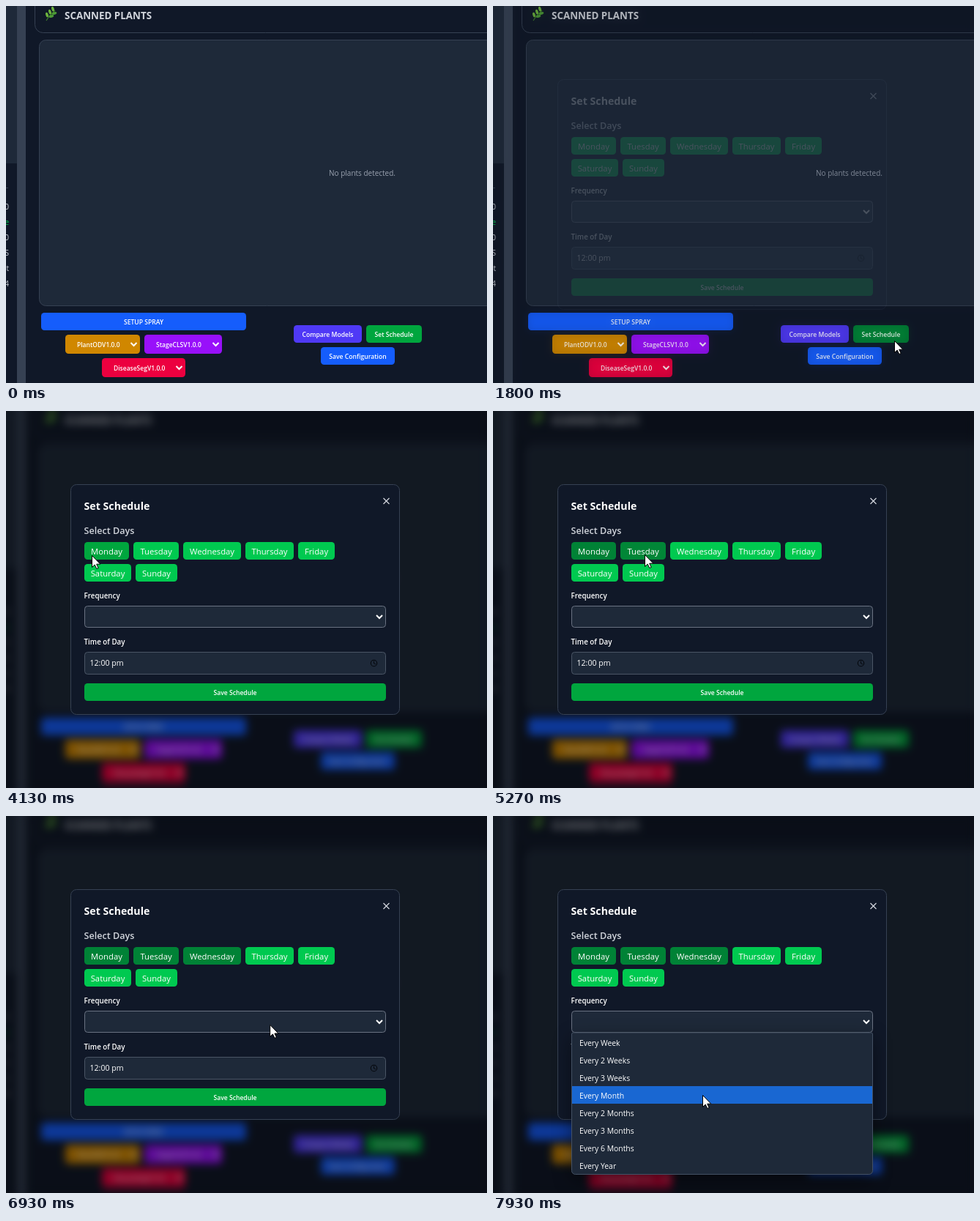
An HTML page with a canvas that plays this animation: 657 px wide and 515 px high, repeating every 8000 ms.

```html
<!DOCTYPE html>
<html lang="en">
<head>
<meta charset="utf-8">
<title>Set Schedule</title>
<style>
  html, body { margin: 0; width: 100%; height: 100%; overflow: hidden; background: #101828; }
  canvas { display: block; }
</style>
</head>
<body>
<canvas id="stage" width="657" height="515"></canvas>
<script>
const W = 657, H = 515, LOOP = 8000, FADE = 200;
const PAGE = '#101828', PANEL = '#1e2939', LINE = '#364153', WHITE = '#fff', LIGHT = '#d1d5dc';
const BLUE = '#155dfc';
const GREEN = [[0, 201, 80], [0, 166, 62], [0, 130, 54], [1, 102, 48]];

const stage = document.getElementById('stage').getContext('2d');
const makeLayer = () => {
  const canvas = document.createElement('canvas');
  canvas.width = W;
  canvas.height = H;
  return canvas.getContext('2d');
};
const backdrop = makeLayer(), dialog = makeLayer();

const clamp = v => Math.max(0, Math.min(1, v));
const smooth = v => v * v * (3 - 2 * v);
const mix = (a, b, k) => a.map((v, i) => v + (b[i] - v) * k);
const rgb = c => `rgb(${c.map(Math.round).join(',')})`;

// Pointer moves: eased from one resting place to the next, some along a bend.
const ENTRY = [661, 520];
const MOVES = [
  { start: 280, end: 1260, to: [548, 457] },
  { start: 2440, end: 3270, to: [182, 175], bend: [526, 184] },
  { start: 3320, end: 4130, to: [117, 197], bend: [120, 206] },
  { start: 4530, end: 4790, to: [207, 196] },
  { start: 5300, end: 5670, to: [292, 196] },
  { start: 6150, end: 6470, to: [409, 246] },
  { start: 6640, end: 7000, to: [355, 289] },
  { start: 7620, end: 7930, to: [286, 381] }
];

function pointerAt(t) {
  let from = ENTRY;
  for (const { start, end, to, bend = mix(from, to, 0.5) } of MOVES) {
    if (t < end) {
      const k = smooth(clamp((t - start) / (end - start)));
      return mix(mix(from, bend, k), mix(bend, to, k), k);
    }
    from = to;
  }
  return from;
}

// Hover colour fades in and out: the share of the fade window spent inside the box.
function hoverLevel(t, x, y, w, h) {
  const steps = 16;
  let inside = 0;
  for (let i = 0; i < steps; i++) {
    const [px, py] = pointerAt(t - i * FADE / steps);
    if (px >= x && px < x + w && py >= y && py < y + h) inside++;
  }
  return inside / steps;
}

function text(c, str, x, y, size, { weight = 400, color = WHITE, align = 'left' } = {}) {
  c.font = `${weight} ${size}px "Open Sans", "Noto Sans", sans-serif`;
  c.fillStyle = color;
  c.textAlign = align;
  c.fillText(str, x, y);
}

function box(c, x, y, w, h, r, fill, border) {
  const inset = border ? 0.5 : 0;
  c.beginPath();
  c.roundRect(x + inset, y + inset, w - 2 * inset, h - 2 * inset, r);
  c.fillStyle = fill;
  c.fill();
  if (border) {
    c.strokeStyle = border;
    c.lineWidth = 1;
    c.stroke();
  }
}

function line(c, points, color, width) {
  c.beginPath();
  points.forEach(([x, y]) => c.lineTo(x, y));
  c.strokeStyle = color;
  c.lineWidth = width;
  c.stroke();
}

const chevron = (c, x, y) => line(c, [[x - 4, y - 2], [x, y + 2], [x + 4, y - 2]], WHITE, 2);

function button(c, label, x, y, w, fill) {
  box(c, x, y, w, 24, 4.5, fill);
  text(c, label, x + w / 2, y + 16, 8.6, { weight: 600, align: 'center' });
}

function picker(c, label, x, y, w, fill) {
  box(c, x, y, w, 26, 4.5, fill);
  text(c, label, x + 16, y + 17, 8.5, { weight: 600 });
  chevron(c, x + w - 8.5, y + 13);
}

// Lays out [label, width, fill] items side by side around a centre.
function row(c, draw, center, y, ...items) {
  const gap = 6;
  let x = center - (items.reduce((sum, item) => sum + item[1] + gap, -gap)) / 2;
  for (const [label, w, fill] of items) {
    draw(c, label, x, y, w, fill);
    x += w + gap;
  }
}

function sprig(c) {
  line(c, [[55, 20], [59, 14], [67, 6]], '#3f7d2c', 1.2);
  for (let i = 0; i < 5; i++) {
    const side = i % 2 ? 1 : -1;
    c.beginPath();
    c.ellipse(58 + 2 * i + 2 * side, 14 - 2 * i + 2 * side, 3.4, 1.8, 0.5 - side * 0.8, 0, 7);
    c.fillStyle = side > 0 ? '#4c9a36' : '#6cb33e';
    c.fill();
  }
}

function drawPage(c, hover) {
  c.fillStyle = PAGE;
  c.fillRect(0, 0, W, H);
  c.fillStyle = PANEL;
  c.fillRect(0, 0, 15, 215);
  c.fillStyle = LINE;
  c.fillRect(15, 0, 12, H);
  c.fillRect(0, 248, 3, 1);
  [...'0e0St4'].forEach((ch, i) =>
    text(c, ch, 4, 278 + 21 * i, 10, { color: ch === 'e' ? '#00c950' : LIGHT, align: 'right' }));

  box(c, 39, -40, W, 77, 11, PAGE, LINE);
  sprig(c);
  text(c, 'SCANNED PLANTS', 80, 18, 13.4, { weight: 700, color: LIGHT });
  box(c, 45, 46, W, 364, 9, PANEL, LINE);
  text(c, 'No plants detected.', 441, 232, 10, { color: '#99a1af' });

  const schedule = rgb(mix(GREEN[1], GREEN[2], hover));
  row(c, button, 188, 419, ['SETUP SPRAY', 280, BLUE]);
  row(c, picker, 188, 449, ['PlantODV1.0.0', 102, '#d08700'], ['StageCLSV1.0.0', 106, '#9810fa']);
  row(c, picker, 188, 481, ['DiseaseSegV1.0.0', 114, '#ec003f']);
  row(c, button, 480.5, 436, ['Compare Models', 93, '#4f39f6'], ['Set Schedule', 76, schedule]);
  row(c, button, 480.5, 466, ['Save Configuration', 101, BLUE]);
}

function drawBackdrop() {
  const page = makeLayer();
  drawPage(page, 0);
  backdrop.filter = 'blur(6px)';
  // Repeated passes make the soft outer edges opaque.
  for (let i = 0; i < 6; i++) backdrop.drawImage(page.canvas, 0, 0);
  backdrop.filter = 'none';
  backdrop.fillStyle = 'rgba(0,0,0,0.4)';
  backdrop.fillRect(0, 0, W, H);
}

const DAYS = { Monday: 61, Tuesday: 62, Wednesday: 79, Thursday: 66, Friday: 50, Saturday: 64, Sunday: 57 };
const CLICKS = { Monday: 4440, Tuesday: 5170, Wednesday: 5980 };
const OPTIONS = ['Week', '2 Weeks', '3 Weeks', 'Month', '2 Months', '3 Months', '6 Months', 'Year'];

function drawDays(c, t) {
  const left = 107, right = 519;
  let x = left, y = 179;
  for (const [label, w] of Object.entries(DAYS)) {
    if (x + w >= right) {
      x = left;
      y += 30;
    }
    const hover = hoverLevel(t, x, y, w, 24);
    const plain = mix(GREEN[0], GREEN[1], hover), chosen = mix(GREEN[2], GREEN[3], hover);
    const picked = label in CLICKS ? clamp((t - CLICKS[label]) / FADE) : 0;
    box(c, x, y, w, 24, 4.5, rgb(mix(plain, chosen, picked)));
    text(c, label, x + w / 2, y + 17, 11.3, { weight: 500, align: 'center' });
    x += w + 6;
  }
}

function drawOptions(c, t) {
  c.save();
  c.shadowColor = 'rgba(0,0,0,0.45)';
  c.shadowBlur = 26;
  c.shadowOffsetY = 8;
  c.beginPath();
  c.roundRect(107.5, 296, 411, 193.5, [2, 2, 5, 5]);
  c.fillStyle = PANEL;
  c.fill();
  c.restore();
  c.strokeStyle = '#435063';
  c.lineWidth = 1;
  c.stroke();

  const top = 297, step = 24;
  const current = Math.floor((pointerAt(t)[1] - top) / step);
  OPTIONS.forEach((label, i) => {
    const y = top + step * i;
    if (i === current) {
      c.fillStyle = '#1967d2';
      c.fillRect(108, y, 410, step);
    }
    text(c, 'Every ' + label, 118, y + 17, 10.4);
  });
}

function drawDialog(c, t) {
  c.drawImage(backdrop.canvas, 0, 0);
  box(c, 88, 100, 450, 315, 8, PAGE, LINE);
  text(c, 'Set Schedule', 106.5, 135, 14.2, { weight: 700 });
  line(c, [[515.5, 119], [523.5, 127]], LIGHT, 1.2);
  line(c, [[523.5, 119], [515.5, 127]], LIGHT, 1.2);
  text(c, 'Select Days', 106.5, 168, 12.6, { weight: 600, color: LIGHT });
  drawDays(c, t);

  text(c, 'Frequency', 106.5, 256, 9.8, { weight: 600 });
  box(c, 107, 266, 412, 30, 4, PANEL, '#6a7282');
  chevron(c, 510, 281);

  text(c, 'Time of Day', 106.5, 319, 9.8, { weight: 600 });
  box(c, 107, 329, 412, 31, 4, PANEL, '#4a5565');
  text(c, '12:00 pm', 114.5, 348, 10.6, { weight: 500 });
  c.beginPath();
  c.arc(502.5, 344.5, 4.2, 0, 7);
  c.strokeStyle = '#05080d';
  c.lineWidth = 1.1;
  c.stroke();
  line(c, [[502.5, 341.5], [502.5, 344.8], [505, 345.8]], '#05080d', 1);

  button(c, 'Save Schedule', 107, 372, 412, rgb(GREEN[1]));
  if (t >= 7390) drawOptions(c, t);
}

function drawPointer(c, [x, y]) {
  const shape = [[0, 0], [0, 16], [3.7, 12.6], [6.3, 18], [8.7, 17], [6.2, 11.7], [11.3, 11.7]];
  c.beginPath();
  shape.forEach(([dx, dy]) => c.lineTo(x + 0.5 + dx, y + 0.5 + dy));
  c.closePath();
  c.fillStyle = WHITE;
  c.fill();
  c.strokeStyle = '#000';
  c.lineWidth = 1;
  c.stroke();
}

function render(t) {
  const shown = clamp((t - 1760) / 220);
  if (shown < 1) drawPage(stage, hoverLevel(t, 492, 436, 76, 24));
  if (shown > 0) {
    drawDialog(dialog, t);
    stage.globalAlpha = shown;
    stage.drawImage(dialog.canvas, 0, 0);
    stage.globalAlpha = 1;
  }
  drawPointer(stage, pointerAt(t));
}

drawBackdrop();
const start = performance.now();
function tick() {
  render((performance.now() - start) % LOOP);
  requestAnimationFrame(tick);
}
tick();
</script>
</body>
</html>
```
